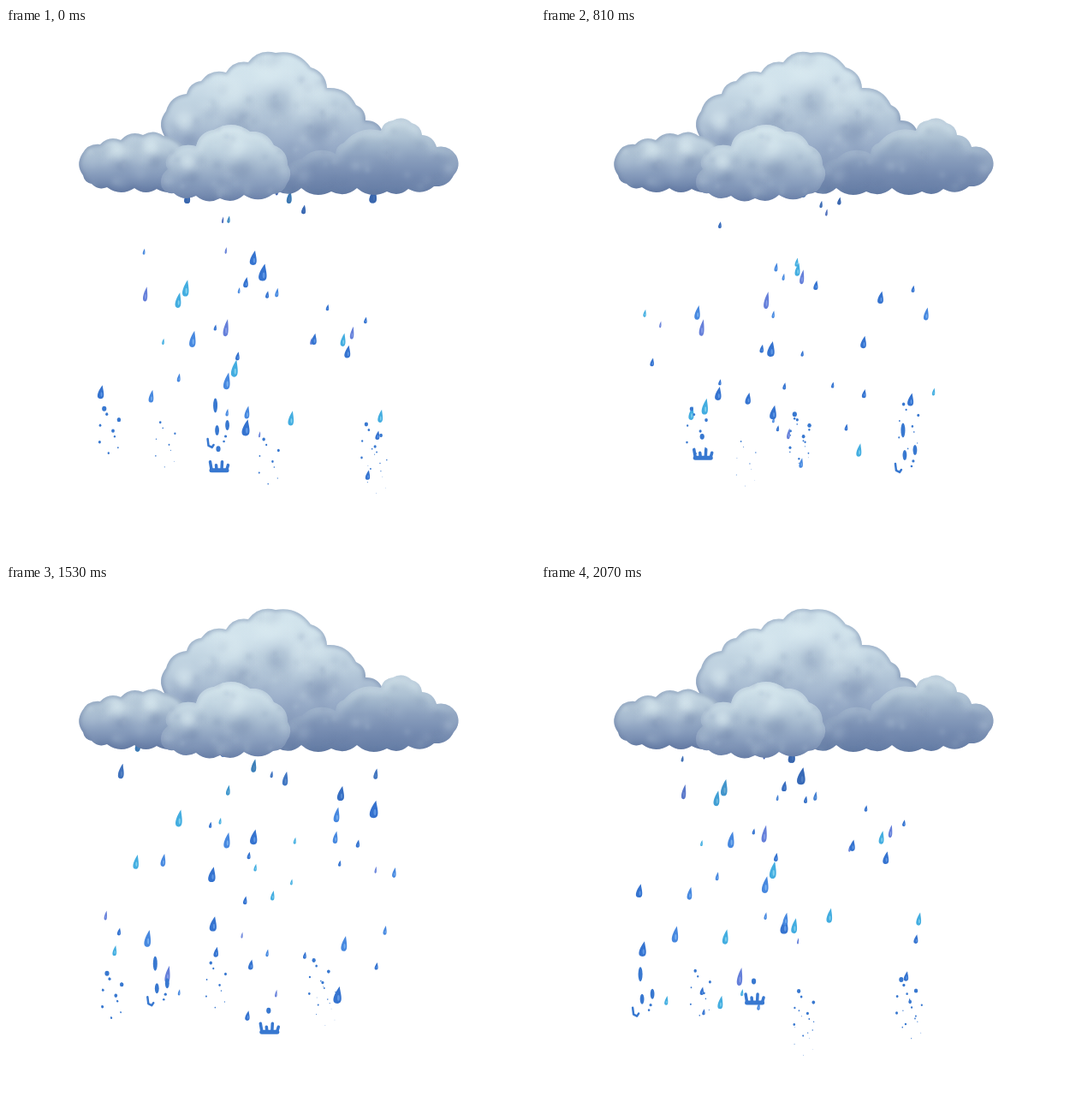
These frames come from a looping animation (618 by 618 pixels, 2.16 s). An HTML page with a canvas:

```html
<!DOCTYPE html>
<html lang="en">
<head>
<meta charset="utf-8">
<title>Rain cloud</title>
<style>
  html, body { margin: 0; width: 100%; height: 100%; overflow: hidden; background: #fff; }
  canvas { position: absolute; left: 0; top: 0; width: 618px; height: 618px; }
</style>
</head>
<body>
<canvas id="rain" width="618" height="618"></canvas>
<canvas id="cloud" width="618" height="618"></canvas>
<script>
const STEP = 90, STEPS = 24, TOP = 175;
const rain = document.getElementById('rain').getContext('2d');
const sky = document.getElementById('cloud').getContext('2d');
const mod = (n, m = STEPS) => ((n % m) + m) % m;

let seed = 71;
const rnd = () => (seed = (seed * 16807) % 2147483647) / 2147483647;
const between = (a, b) => a + (b - a) * rnd();

// ---------- Cloud ----------

const LIGHT = '222,238,243', DARK = '96,118,158';

// Clockwise outline whose sides bulge outwards between the notches
function scallop(notches) {
  const path = new Path2D();
  path.moveTo(...notches[0]);
  notches.forEach(([ax, ay], i) => {
    const [bx, by] = notches[(i + 1) % notches.length];
    const len = Math.hypot(bx - ax, by - ay), push = 2 * Math.min(7, len * .17) / len;
    path.quadraticCurveTo((ax + bx) / 2 + (by - ay) * push, (ay + by) / 2 - (bx - ax) * push, bx, by);
  });
  path.closePath();
  return path;
}

function ramp(from, to, colors) {
  const g = sky.createLinearGradient(0, from, 0, to);
  colors.forEach((c, i) => g.addColorStop(i / (colors.length - 1), c));
  return g;
}

function glow(x, y, r, rgb, alpha) {
  const g = sky.createRadialGradient(x, y, 0, x, y, r);
  [1, .75, .3, .07, 0].forEach((a, i) => g.addColorStop(i / 4, `rgba(${rgb},${a * alpha})`));
  sky.fillStyle = g;
  sky.fillRect(x - r, y - r, 2 * r, 2 * r);
}

function soft(path, blur, width, style) {
  sky.filter = `blur(${blur}px)`;
  sky.lineWidth = width;
  sky.strokeStyle = style;
  sky.stroke(path);
  sky.filter = 'none';
}

// Each lobe is lit from above and shades what lies below it
function puff({ notches, from, to, tones, lobes = [], rim = 0, edge = .5 }) {
  const path = scallop(notches);
  sky.save();
  sky.fillStyle = ramp(from, to, tones);
  sky.fill(path);
  sky.clip(path);
  lobes.forEach(([x, y, r]) => glow(x + r * .3, y + r, r, DARK, .32));
  lobes.forEach(([x, y, r]) => glow(x, y, r * 1.2, LIGHT, .6));
  if (rim) soft(path, 5, 14, ramp(from, to, [`rgba(${LIGHT},${rim})`, `rgba(${LIGHT},${rim * .6})`, `rgba(${LIGHT},0)`]));
  soft(path, 2, 4, `rgba(${DARK},${edge})`);
  sky.restore();
}

puff({  // dome
  notches: [[185,126],[187,97],[211,77],[228,62],[257,52],[283,40],[315,29],[356,46],
    [375,70],[409,90],[420,108],[440,121],[436,175],[190,175]],
  from: 22, to: 175,
  tones: ['#d4e6ee', '#cee0ea', '#b9ccdc', '#99adc8', '#7f94b6'],
  lobes: [[208,108,22],[262,74,36],[308,50,36],[352,82,38]]
});
puff({  // left
  notches: [[90,172],[89,147],[110,136],[134,131],[160,125],[184,126],[212,150],[208,185],
    [176,188],[150,187],[118,186],[100,182]],
  from: 120, to: 191,
  tones: ['#c8dae5', '#b5c8d8', '#8da2c0', '#667da6'],
  lobes: [[130,142,18],[168,138,18]]
});
puff({  // right
  notches: [[326,170],[345,153],[385,147],[395,134],[438,120],[452,108],[474,111],[486,125],
    [503,139],[526,149],[523,172],[500,185],[470,188],[445,191],[410,187],[380,191],[345,187],[318,191]],
  from: 106, to: 194,
  tones: ['#c4d5e0', '#adc1d3', '#8ba0be', '#758bb0', '#627aa3'],
  rim: .4, edge: .15
});
puff({  // front
  notches: [[182,186],[189,165],[190,149],[222,138],[243,119],[285,121],[313,137],[329,160],
    [328,182],[312,194],[278,195],[250,199],[222,196],[196,193]],
  from: 116, to: 202,
  tones: ['#d0e2ea', '#c3d6e2', '#a9bdd1', '#8a9fbe', '#6a81a9'],
  lobes: [[212,156,18],[268,138,26]],
  rim: .35, edge: .2
});

// Faint watercolour mottling, kept inside the cloud
sky.globalCompositeOperation = 'source-atop';
for (let i = 0; i < 300; i++)
  glow(between(86, 528), between(22, 198), between(7, 18), i % 2 ? LIGHT : DARK, .09);

// ---------- Rain ----------

const HUES = { b: ['#3573cf', '#5d97e6'], m: ['#4788df', '#78b0f0'],
               c: ['#43ade0', '#7fd0ee'], p: ['#657fd9', '#8aa2ea'] };

function drawDrop(x, y, h, hue) {
  const w = h * (hue === 'p' ? .15 : hue === 'b' ? .25 : .2);
  const tipX = x + h * .13, tipY = y - h / 2, base = y + h / 2;
  const path = new Path2D();
  path.moveTo(tipX, tipY);
  path.bezierCurveTo(tipX + w * .2, y - h * .1, x + w * 1.6, base, x, base);
  path.bezierCurveTo(x - w * 1.6, base, x - w, y, tipX, tipY);
  rain.fillStyle = HUES[hue][0];
  rain.fill(path);
  rain.fillStyle = HUES[hue][1];
  blob(x + w * .25, y + h * .17, w * .28, h * .17);
  if (y < 265) {  // shade beneath the cloud
    rain.globalAlpha = Math.min(.7, (265 - y) / 90);
    rain.fillStyle = '#3b5f9c';
    rain.fill(path);
    rain.globalAlpha = 1;
  }
}

const drops = Array.from({ length: 245 }, () => ({
  x: rnd() < .25 ? between(250, 335) : between(122, 485),
  birth: STEPS * rnd(),
  speed: between(58, 70),
  h: 7 + 14 * rnd() ** 1.8,
  hue: 'bbbbbmmmccpp'[Math.floor(12 * rnd())],
  end: between(410, 535)
}));

// ---------- Splashes ----------

// One impact per step, skipping between six evenly spaced lanes
const splashes = Array.from({ length: STEPS }, (_, i) => ({
  x: 122 + 62 * mod(2 * i + 2 - Math.floor((i + 2) / 6), 6) + between(-6, 6),
  y: between(490, 534),
  birth: i
}));

function blob(x, y, rx, ry = rx) {
  rain.beginPath();
  rain.ellipse(x, y, rx, ry, 0, 0, 2 * Math.PI);
  rain.fill();
}

function line(width, ...pts) {
  rain.lineWidth = width;
  rain.beginPath();
  pts.forEach(p => rain.lineTo(...p));
  rain.stroke();
}

function crown() {
  line(5, [-9, -3], [9, -3]);
  for (let k = -1.5; k < 2; k++) line(3.5, [6 * k, -4], [7 * k, -11 - 2 * Math.sin(3 * k)]);
  blob(-1, -28, 2.6, 3.4);
}

function jets() {
  blob(-5, -50, 2.5, 8.5);
  for (const side of [-1, 1]) blob(3 + 6 * side, -24 - 3 * side, 2.4, 6);
  line(2.5, [-14, -11], [-13, -3], [-9, -1], [-7, -4]);
  blob(7, -14, 1.6);
  blob(5, -8, 1.3);
}

// Dots that scatter, then sink and shrink
function spray(age) {
  for (let k = 0; k < 9; k++) {
    const r = (2.6 - .18 * k) * (k % 2 ? .65 : 1) * (1 - .17 * age);
    blob(12 * Math.sin(2.3 * k + 3.7), -60 + 6.5 * k + 2 * age ** 2, r, r * 1.15);
  }
}

function drawSplash({ x, y, birth }, step) {
  const age = mod(step - birth);
  if (age > 6) return;
  rain.save();
  rain.translate(x, y);
  rain.lineCap = rain.lineJoin = 'round';
  rain.fillStyle = rain.strokeStyle = '#3878d0';
  if (age === 0) crown();
  else if (age === 1) jets();
  else spray(age - 2);
  rain.restore();
}

function draw(now) {
  const step = Math.floor(now / STEP) % STEPS;
  rain.clearRect(0, 0, 618, 618);
  for (const d of drops) {
    const age = mod(step - d.birth), y = TOP + d.speed * age;
    if (y < d.end) drawDrop(d.x - 4 * age, y, d.h, d.hue);
  }
  splashes.forEach(s => drawSplash(s, step));
}

const start = performance.now();
function tick() {
  draw(performance.now() - start);
  requestAnimationFrame(tick);
}
tick();
</script>
</body>
</html>
```
